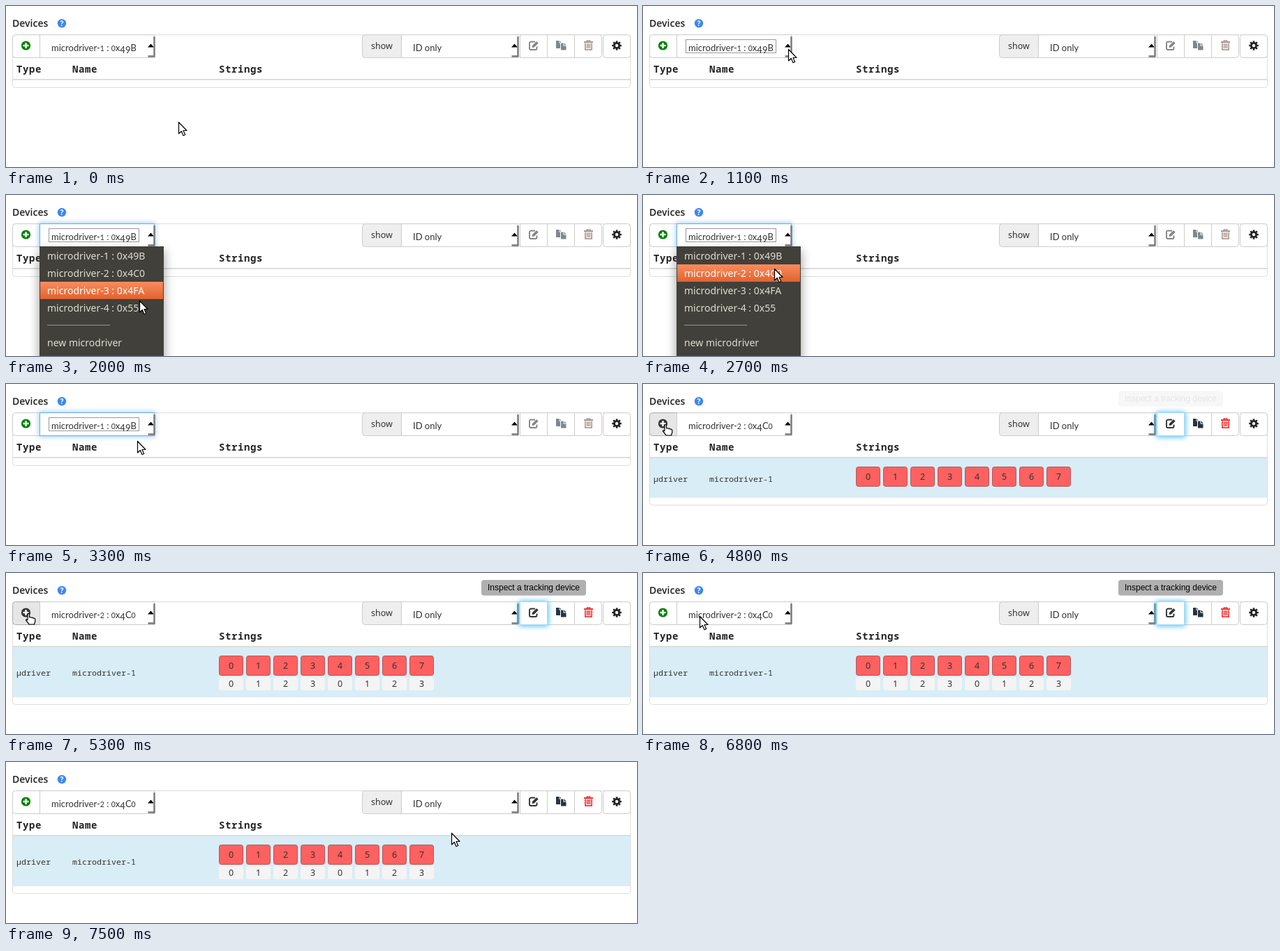
These frames come from a looping animation (904 by 232 pixels, 8500 ms). An HTML page:

```html
<!DOCTYPE html>
<html lang="en">
<head>
<meta charset="utf-8">
<title>Devices</title>
<style>
html, body { margin: 0; width: 100%; height: 100%; overflow: hidden; background: #fff; }
svg { display: block; }
text { fill: #333; white-space: pre; }
.title { font: 600 14px "Open Sans", sans-serif; fill: #222; }
.head { font: 700 14px "Noto Sans Mono", monospace; letter-spacing: .6px; fill: #222; }
.cell { font: 11.67px "Noto Sans Mono", monospace; }
.pick { font: 13px Lato, sans-serif; }
.ui { font: 12.5px "Noto Sans", sans-serif; }
.menu { font: 14px "Noto Sans", sans-serif; fill: #dfdbd2; }
.tip { font: 12px "Liberation Sans", Arial, sans-serif; fill: #000; }
.mid { text-anchor: middle; }
.box { fill: #fff; stroke: #ccc; }
.line { fill: none; stroke: #ddd; }
.blur { filter: blur(3.5px); }
</style>
</head>
<body>
<svg width="904" height="232" viewBox="0 0 904 232">
  <defs>
    <linearGradient id="warm" x2="0" y2="1">
      <stop stop-color="#f98c5e"/><stop offset="1" stop-color="#e1622f"/>
    </linearGradient>
    <g id="arrow">
      <path d="M5.5 .5L10 5.5H1Z" transform="translate(-5.5 -3)" fill="#000"/>
      <path d="M5 -13V15.5H-4" fill="none" stroke="#777" stroke-width="2.4"/>
    </g>
  </defs>

  <text class="title" x="9" y="30">Devices</text>
  <circle cx="80" cy="25" r="6.2" fill="#3d86f5"/>
  <text x="80" y="28.8" class="mid" style="font:700 10.5px 'Open Sans',sans-serif;fill:#fff">?</text>

  <rect id="panel" class="line" x="9.5" y="41.5" width="885" rx="4"/>
  <text class="head" x="15" y="96">Type</text>
  <text class="head" x="95" y="96">Name</text>
  <text class="head" x="305" y="96">Strings</text>

  <g id="row">
    <rect id="rowBg" x="10" y="107" width="884" fill="#d9edf7"/>
    <g id="rowText">
      <text class="cell" x="15" y="141">µdriver</text>
      <text class="cell" x="95" y="141">microdriver-1</text>
    </g>
    <g id="strings"></g>
    <g id="subs"></g>
  </g>
  <rect x="10" y="105" width="884" height="2" fill="#ddd"/>

  <path id="plusBox" class="box" d="M48.5 41.5H13.5a4 4 0 0 0-4 4V70.500a4 4 0 0 0 4 4H48.500Z"/>
  <g transform="translate(28.500 57)">
    <circle id="plus" r="6.600"/>
    <path d="M-4 0H4M0-4V4" stroke="#fff" stroke-width="2.400"/>
  </g>

  <rect id="focusGlow" class="blur" x="47" y="40" width="167" height="36" rx="2" fill="#66afe9"/>
  <rect id="select" class="box" x="48.500" y="41.500" width="164" height="33"/>
  <rect id="dots" x="61.500" y="48.500" width="129" height="19" fill="none" stroke="#333" stroke-dasharray="1 1"/>
  <text id="picked" class="pick" x="65" y="65"></text>
  <use href="#arrow" x="207.500" y="57"/>

  <path d="M566.500 41.500H514.500a4 4 0 0 0-4 4V70.500a4 4 0 0 0 4 4H566.500Z" fill="#eee" stroke="#ccc"/>
  <text class="ui" x="523" y="62">show</text>
  <rect class="box" x="566.500" y="41.500" width="167" height="33"/>
  <text class="pick" x="583" y="65">ID only</text>
  <use href="#arrow" x="728.500" y="57"/>

  <rect class="box" x="775.500" y="41.500" width="39" height="33"/>
  <path class="box" d="M814.500 41.500H849.500a4 4 0 0 1 4 4V70.500a4 4 0 0 1-4 4H814.500Z"/>
  <rect class="box" x="855.500" y="41.500" width="39" height="33" rx="4"/>
  <rect id="editGlow" class="blur" x="734.500" y="40" width="43" height="37" rx="4" fill="#35b5ff"/>
  <rect id="editBox" class="box" x="736.500" y="41.500" width="39" height="33"/>

  <g id="edit" transform="translate(749 50)" fill="none">
    <path d="M9 1.500H3a2 2 0 0 0-2 2V11a2 2 0 0 0 2 2H9.500a2 2 0 0 0 2-2V8.500" stroke="currentColor" stroke-width="1.900"/>
    <path d="M4.500 10L5 7L11 1L13.700 3.600L7.700 9.500Z" fill="currentColor"/>
  </g>
  <g id="copy" transform="translate(788 50)" fill="currentColor">
    <path d="M0 0H4.500V3.500H6V11H0Z"/>
    <path d="M5.300 0L7.500 2.500H5.300Z"/>
    <path d="M7 3.500H10.500V7.500H14.500V13.500H7Z"/>
    <path d="M11.500 3.300L14.700 6.500H11.500Z"/>
  </g>
  <g id="trash" transform="translate(828 49)" fill="none" stroke="currentColor">
    <path d="M0 3H13" stroke-width="1.800"/>
    <path d="M4.300 2.500V.8H8.700V2.500" stroke-width="1.300"/>
    <path d="M1.900 4.500V14H11.100V4.500" stroke-width="1.500"/>
    <path d="M4.500 5V12M6.500 5V12M8.500 5V12" stroke-width="1.200"/>
  </g>
  <g transform="translate(875 57)" fill="none" stroke="#222">
    <circle r="3.600" stroke-width="2.800"/>
    <path id="teeth" stroke-width="2.600"/>
  </g>

  <g id="tip">
    <rect x="681" y="10" width="150" height="22.500" rx="4" fill="#b0b0b0"/>
    <text class="tip mid" x="756" y="25">Inspect a tracking device</text>
  </g>

  <g id="menu">
    <rect x="46" y="80" width="182" height="170" fill="#000" opacity=".32" style="filter:blur(7px)"/>
    <rect x="48" y="74" width="178" height="170" fill="#42403a"/>
    <rect id="hover" x="49" width="176" height="25" fill="url(#warm)"/>
    <g id="items"></g>
    <path d="M59 187.500H149" stroke="#98958c"/>
  </g>

  <g id="pointer" fill="#fff" stroke="#000" stroke-linejoin="round">
    <path id="cursor" d="M.5 .5V17L4.300 13.500L7 19.700L9.700 18.500L7 12.500H12Z" stroke-width="1.200"/>
    <path id="hand" stroke-width="1.200" d="M-1 1.500Q0-.5 1.500 1.500V6Q3 4.800 4.200 6.500Q6 5.500 7 7.200Q9.500 6.500 9.800 9V12Q9 14 8.500 16H1Q-.5 13.500-3.500 10Q-3.500 8-1 9.700Z"/>
  </g>
</svg>
<script>
const NS = "http://www.w3.org/2000/svg";
const $ = id => document.getElementById(id);

function add(parent, tag, attrs, text = "") {
  const el = document.createElementNS(NS, tag);
  for (const key in attrs) el.setAttribute(key, attrs[key]);
  el.textContent = text;
  return parent.appendChild(el);
}
const show = (id, on) => { $(id).style.opacity = +on; };

for (let i = 0; i < 8; i++) {
  const x = 305 + 39 * i;
  add($("strings"), "rect", { x: x + .5, y: 119.5, width: 34, height: 28, rx: 3, fill: "#ff6060", stroke: "#b05a5c" });
  add($("strings"), "text", { x: x + 17.5, y: 138, class: "ui mid" }, i);
  add($("subs"), "rect", { x, y: 150, width: 35, height: 19, rx: 3, fill: "#f4f4f4" });
  add($("subs"), "text", { x: x + 17.5, y: 164, class: "ui mid" }, i % 4);
}

const names = ["microdriver-1 : 0x49B", "microdriver-2 : 0x4C0", "microdriver-3 : 0x4FA",
  "microdriver-4 : 0x55", "", "new microdriver", "new device"];
const items = names.map((name, i) => add($("items"), "text", { x: 59, y: 93 + 25 * i, class: "menu" }, name));

let teeth = "";
for (let i = 0; i < 8; i++) {
  const a = i * Math.PI / 4, c = Math.cos(a), s = Math.sin(a);
  teeth += `M${4 * c} ${4 * s}L${6.8 * c} ${6.8 * s}`;
}
$("teeth").setAttribute("d", teeth);

// Lowered and small digits imitate old-style numerals.
function setPicked(name) {
  const el = $("picked");
  if (el.textContent === name) return;
  el.textContent = "";
  let drop = 0;
  for (const ch of name) {
    const low = /[49]/.test(ch) ? 2.5 : 0;
    const part = add(el, "tspan", { dy: low - drop }, ch);
    if (/[012]/.test(ch)) part.style.fontSize = "10.5px";
    drop = low;
  }
}

// start, end, from x, y, to x, y
const moves = [
  [100, 1000, 247, 167, 208, 62],
  [1500, 2100, 208, 62, 189, 164],
  [2300, 2900, 189, 164, 188, 82],
  [3400, 4200, 188, 82, 32, 58],
  [6700, 7500, 32, 58, 638, 102]
];
const clamp = (v, lo, hi) => Math.min(hi, Math.max(lo, v));
const ramp = (t, start, length) => clamp((t - start) / length, 0, 1);
const swing = p => (1 - Math.cos(Math.PI * p)) / 2;

function place(t) {
  const [a, b, x0, y0, x1, y1] = moves.filter(m => t >= m[0]).pop() || moves[0];
  const p = ramp(t, a, b - a), k = (p + swing(p)) / 2;
  return [x0 + (x1 - x0) * k, y0 + (y1 - y0) * k];
}

function draw(t) {
  const [x, y] = place(t);
  const onPlus = t >= 4000 && t < 6800 && x < 49;
  $("pointer").setAttribute("transform", `translate(${Math.round(x)} ${Math.round(y)})`);
  show("cursor", !onPlus);
  show("hand", onPlus);
  $("plusBox").style.fill = onPlus ? "#e6e6e6" : "#fff";
  $("plusBox").style.stroke = onPlus ? "#adadad" : "#ccc";
  $("plus").style.fill = onPlus ? "#333" : "#008000";

  const focused = t >= 1100 && t < 4500;
  const glow = focused ? ramp(t, 1100, 200) : 0;
  show("dots", focused);
  show("focusGlow", glow * .65);
  $("select").style.stroke = glow ? "#66afe9" : "#ccc";

  show("menu", t >= 1200 && t < 3200);
  const hot = clamp(Math.floor((place(t - 100)[1] - 75) / 25), 0, 3);
  $("hover").setAttribute("y", 75 + 25 * hot);
  items.forEach((el, i) => { el.style.fill = i === hot ? "#fff" : "#dfdbd2"; });

  const added = t >= 4600, mapped = t >= 5000;
  setPicked(names[+added]);
  show("row", added);
  show("subs", mapped);
  $("rowBg").setAttribute("height", mapped ? 72 : 57);
  $("rowText").setAttribute("transform", `translate(0 ${mapped ? 7 : 0})`);
  $("panel").setAttribute("height", mapped ? 148 : added ? 133 : 76);
  $("edit").style.color = added ? "#333" : "#858585";
  $("copy").style.color = added ? "#263442" : "#7f878e";
  $("trash").style.color = added ? "#f01818" : "#a08b80";

  const lit = t >= 4700 && t < 6900;
  show("editGlow", lit * .8);
  $("editBox").style.stroke = lit ? "#a5daf5" : "#ccc";
  show("tip", swing(ramp(t, 4700, 500)) * (1 - swing(ramp(t, 6800, 500))));
}

const began = performance.now();
function tick() {
  const t = (performance.now() - began) % 8500;
  draw(Math.floor(t / 100) * 100);
  requestAnimationFrame(tick);
}
tick();
</script>
</body>
</html>
```
